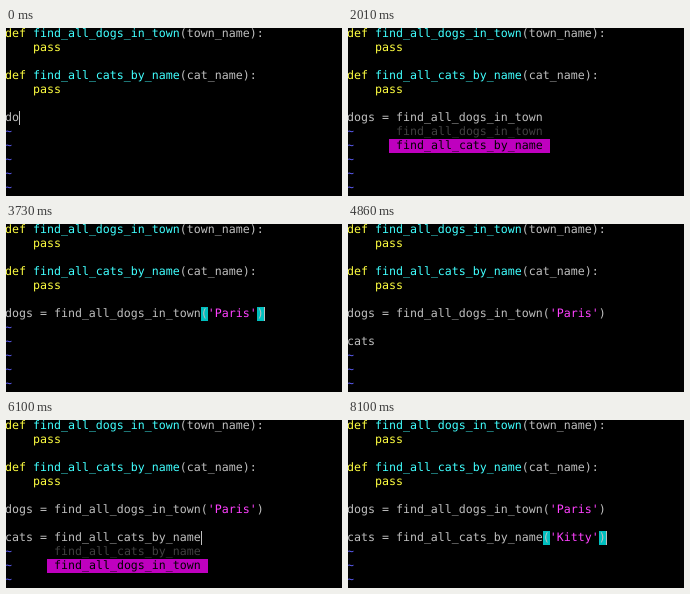
Animation, 336 px wide and 168 px high, one loop 8330 ms. Source, as an HTML page:

```html
<!DOCTYPE html>
<html lang="en">
<head>
<meta charset="utf-8">
<title>Completion in a terminal editor</title>
<style>
  html, body { margin: 0; width: 100%; height: 100%; overflow: hidden; background: #000; }
  #screen {
    position: absolute; left: 0; top: 0; width: 336px; height: 168px; overflow: hidden;
    color: #bfbfbf; background: #000;
    font: 11.627px/12px "DejaVu Sans Mono", monospace;
    text-rendering: geometricPrecision; font-variant-ligatures: none;
  }
  .row { position: absolute; height: 14px; white-space: pre; }
  .row span { display: inline-block; height: 14px; vertical-align: top; }
  .key { color: #ffff40; }
  .name { color: #40ffff; }
  .str { color: #ff40ff; }
  .tilde { color: #6060ff; }
  .match { background: #00bfbf; }
  .item { color: #000; background: #bf00bf; }
  .picked { color: #404040; background: #000; }
  .cursor { position: absolute; width: 1px; height: 14px; background: #bfbfbf; }
</style>
</head>
<body>
<div id="screen"></div>
<script>
const LOOP = 8330, COL = 7, ROW = 14, ROWS = 12;
const DOGS = 'find_all_dogs_in_town', CATS = 'find_all_cats_by_name';
const dogs = 'dogs = ' + DOGS, cats = 'cats = ' + CATS;

// [time, text with "|" as the cursor, picked menu entry]
const first = [
  [0, 'do|'], [130, 'do'], [380, 'dog|'], [510, 'dogs|'], [630, 'dogs |'],
  [880, 'dogs =|'], [1010, 'dogs = |'], [1260, 'dogs = f|'],
  [1400, 'dogs = fi|'], [1520, 'dogs = fin|'], [1640, 'dogs = find|'],
  [1890, dogs + '|', DOGS], [2010, dogs, DOGS],
  [2380, dogs + '(|'], [2510, dogs + "('|"],
  [2990, dogs + "('Pari|"], [3110, dogs + "('Paris'|"],
  [3360, dogs + "|('Paris')"], [3730, dogs + "('Paris')|"],
  [4110, dogs + "('Paris')"]
];
const second = [
  [4110, '|'], [4220, 'c|'], [4360, 'ca|'], [4610, 'cats|'], [4860, 'cats'],
  [4980, 'cats = |'], [5350, 'cats = fi|'], [5470, 'cats = find|'],
  [5620, 'cats = ' + DOGS + '|', DOGS], [5970, 'cats = ' + DOGS, DOGS],
  [6100, cats + '|', CATS], [6230, cats + '(|'],
  [6480, cats + "('|"], [6600, cats + "('"],
  [6850, cats + "('Kit|"], [6980, cats + "('Kitt|"], [7230, cats + "('Kitty|"],
  [7600, cats + "|('Kitty')"], [8100, cats + "('Kitty')|"]
];

const screen = document.getElementById('screen');
const span = (cls, text) => `<span class="${cls}">${text}</span>`;
const place = (col, row) => `left:${col * COL - 1}px;top:${row * ROW - 1}px`;
const line = (row, html, col = 0) => `<div class="row" style="${place(col, row)}">${html}</div>`;
const stepAt = (steps, t) => steps.filter(s => s[0] <= t).pop();

const define = (row, name, arg) =>
  line(row, span('key', 'def') + ' ' + span('name', name) + `(${arg}):`) +
  line(row + 1, span('key', 'pass'), 4);

const header = define(0, DOGS, 'town_name') + define(3, CATS, 'cat_name');

function typed(row, [, text, picked], order) {
  const plain = text.replace('|', '');
  const at = text.indexOf('|');
  let html = plain.replace(/'[^']*'?/, s => span('str', s));
  if (text.endsWith(')|')) html = html.replace(/[()]/g, s => span('match', s));
  html = line(row, html);
  if (at >= 0) html += `<div class="cursor" style="${place(at, row)}"></div>`;
  if (picked) {
    order.forEach((name, i) => {
      html += line(row + 1 + i, span(name === picked ? 'picked' : 'item', ` ${name} `), 6);
    });
  }
  return html;
}

function render(a, b) {
  let html = header;
  for (let row = b ? 9 : 7; row < ROWS; row++) html += line(row, span('tilde', '~'));
  html += typed(6, a, [DOGS, CATS]);
  if (b) html += typed(8, b, [CATS, DOGS]);
  screen.innerHTML = html;
}

const start = performance.now();
let lastA, lastB;
function tick() {
  const t = (performance.now() - start) % LOOP;
  const a = stepAt(first, t), b = stepAt(second, t);
  if (a !== lastA || b !== lastB) render(lastA = a, lastB = b);
  requestAnimationFrame(tick);
}
tick();
</script>
</body>
</html>
```
